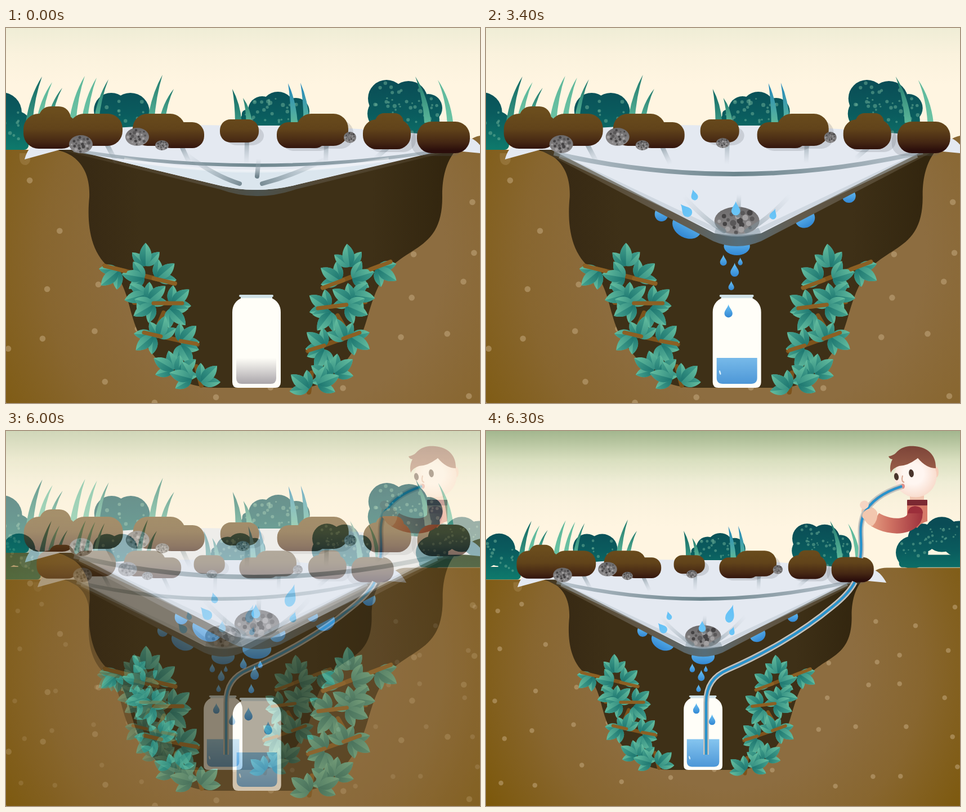
These frames come from a looping animation (842 by 665 pixels, 8000 ms). An HTML page:

```html
<!DOCTYPE html>
<html lang="en">
<head>
<meta charset="utf-8">
<title>Solar still</title>
<style>
html, body { margin: 0; width: 100%; height: 100%; overflow: hidden; }
svg { display: block; width: 100vw; height: 100vh; }
</style>
</head>
<body>
<svg id="stage" viewBox="0 0 842 665" preserveAspectRatio="none"></svg>
<script>
(() => {
let seed = 7;
const rnd = () => (seed = (seed * 16807) % 2147483647) / 2147483647;
const defs = [];

// Gradients in scene coordinates, or in the box of the shape when inBox is true
const grad = (id, [x1, y1, x2, y2], stops, inBox) => {
  defs.push(`<linearGradient id="${id}" x1="${x1}" y1="${y1}" x2="${x2}" y2="${y2}"` +
    (inBox ? '' : ' gradientUnits="userSpaceOnUse"') + '>' +
    stops.map(([o, c, a = 1]) => `<stop offset="${o}" stop-color="${c}" stop-opacity="${a}"/>`).join('') +
    '</linearGradient>');
};
const fade = (id, from, to, across) => grad(id, across ? [0, 0, 1, 0] : [0, 0, 0, 1], [[0, from], [1, to]], true);
grad('sky', [0, -113, 0, 100], [[0, '#a3b78f'], [.1, '#b4c39d'], [.3, '#d9dfbf'], [.53, '#efedd6'], [.75, '#faf2dd'], [1, '#fff5e1']]);
grad('bush', [0, 92, 0, 216], [[0, '#0a4c55'], [.5, '#0a5c5e'], [1, '#0e7a6c']]);
grad('soil', [0, 148, 0, 217], [[0, '#6b4d1d'], [.45, '#61431a'], [.8, '#442613'], [1, '#2b0e0b']]);
grad('pit', [146, 0, 776, 0], [[0, '#382a14'], [.15, '#3e3017'], [.8, '#3e3017'], [1, '#33260f']]);
grad('band', [95, 0, 800, 0], [[0, '#42351d'], [.15, '#574a34'], [.35, '#635b4d'], [.5, '#566d79'], [.65, '#635b4d'], [.85, '#574a34'], [1, '#42351d']]);
grad('fold', [120, 0, 775, 0], [[0, '#8fa0aa', .5], [.25, '#93a3ac'], [.5, '#6c858d'], [.75, '#93a3ac'], [1, '#8fa0aa', .5]]);
grad('water', [0, 570, 0, 631], [[0, '#85c5ef'], [1, '#4d97d7']]);
grad('glass', [0, 585, 0, 631], [[0, '#aaa6aa', 0], [1, '#aaa6aa']]);
grad('sleeve', [685, 0, 778, 0], [[0, '#e39b80'], [.35, '#cf7263'], [1, '#9c2f3b']]);
fade('stone', '#6b696a', '#8f8d8e');
fade('drop', '#6cc3f5', '#3287d3');
fade('pale', '#62bff5', '#6cc6f7');
fade('leaf', '#348f82', '#66bfa0', true);
fade('vein', '#1c756f', '#45a28e', true);
fade('light', '#5cb79a', '#6cc3a4');
fade('mid', '#20796d', '#5cb79a');
fade('dark', '#0f6763', '#3c9883');
fade('blue', '#2185bd', '#5cb79a');
fade('hair', '#7c4438', '#9c604a');
defs.push(`<radialGradient id="ground" gradientUnits="userSpaceOnUse" cx="500" cy="400" r="620">
  <stop offset=".45" stop-color="#8d6d40"/><stop offset=".7" stop-color="#88662f"/><stop offset="1" stop-color="#7c580b"/></radialGradient>
  <radialGradient id="face" cx=".45" cy=".45" r=".6"><stop offset=".4" stop-color="#fff6f1"/><stop offset="1" stop-color="#f8d9c9"/></radialGradient>`);

const path = (d, fill, more = '') => `<path d="${d}" fill="${fill}" ${more}/>`;
const line = (d, color, w, more = '') => path(d, 'none', `stroke="${color}" stroke-width="${w}" ${more}`);
const dot = (x, y, r, fill, more = '') => `<circle cx="${x}" cy="${y}" r="${r}" fill="${fill}" ${more}/>`;
const oval = (x, y, rx, ry, fill, turn = 0) =>
  `<ellipse cx="${x}" cy="${y}" rx="${rx}" ry="${ry}" fill="${fill}" transform="rotate(${turn} ${x} ${y})"/>`;
const box = (x, y, x2, y2, r, fill, more = '') =>
  `<rect x="${x}" y="${y}" width="${x2 - x}" height="${y2 - y}" rx="${r}" fill="${fill}" ${more}/>`;
const each = (list, f) => list.map(a => f(...a)).join('');
const round = 'stroke-linecap="round"';

const bush = (base, n, ...balls) => {
  const x1 = Math.min(...balls.map(b => b[0] - b[2] * .8)), x2 = Math.max(...balls.map(b => b[0] + b[2] * .8));
  let s = each(balls, (x, y, r) => dot(x, y, r, 'url(#bush)')) + box(x1, base - 28, x2, base, 8, 'url(#bush)');
  for (let i = 0; i < n; i++) {
    const [x, y, r] = balls[i % balls.length], a = rnd() * 6.28, d = r * .85 * Math.sqrt(rnd());
    s += dot(x + d * Math.cos(a), y + d * Math.sin(a), 1.5 + rnd() * 2.2, '#6fb39a', 'opacity=".5"');
  }
  return s;
};

// A row of grass blades leaning the same way
const tuft = (x, n, gap, tipY, fall, lean, ...fills) => {
  let s = '';
  for (let i = 0; i < n; i++, x += gap, tipY += fall) {
    const w = 6 - i * .7, cx = x + lean * .2, cy = 165 + (tipY - 165) * .55;
    s += path(`M${x - w} 168Q${cx - w * .7} ${cy} ${x + lean} ${tipY}Q${cx + w * .9} ${cy} ${x + w} 168Z`,
      `url(#${fills[i % fills.length]})`);
  }
  return s;
};

const stone = (x, y, rx, ry) => {
  let s = oval(x, y, rx, ry, 'url(#stone)');
  for (let i = 0; i < 20; i++) {
    const a = i * 2.4, d = Math.sqrt((i + .5) / 20) * .84, r = rx * (.06 + rnd() * .08);
    s += dot(x + Math.cos(a) * d * rx, y + Math.sin(a) * d * ry, r, ['#454344', '#5a5859', '#a3a1a2'][i % 3]);
  }
  return s;
};

const leaf = (x, y, turn, size) => `<g transform="translate(${x} ${y}) rotate(${turn}) scale(${size})">` +
  path('M0 0C.2-.33 .65-.36 1 0C.65 .36 .2 .33 0 0Z', 'url(#leaf)') +
  path('M0 0C.2-.33 .65-.36 1 0Z', 'url(#vein)') + '</g>';
const sprig = (x, y, turn) => leaf(x, y, turn - 45, 34) + leaf(x, y, turn + 45, 35) + leaf(x, y, turn, 41);

const drop = (x, y, s, turn = 0, fill = 'drop', wide = 1) =>
  path('M0-1C.1-.5 .6-.1 .6 .35A.6 .6 0 0 1-.6 .35C-.6-.1-.1-.5 0-1Z', `url(#${fill})`,
    `transform="translate(${x} ${y}) rotate(${turn}) scale(${s * wide} ${s})"`);

// A soft streak, strongest at its first end
let folds = 0;
const crease = (x1, y1, x2, y2, bend = 0, a = .6) => {
  const id = 'crease' + folds++;
  grad(id, [x1, y1, x2, y2], [[0, '#70848d', a], [1, '#a9b6c0', 0]]);
  return line(`M${x1} ${y1}Q${(x1 + x2) / 2} ${(y1 + y2) / 2 + bend} ${x2} ${y2}`, `url(#${id})`, 8, round);
};

// One pebble per cell of a loose grid
const pebbles = () => {
  let s = '';
  for (let y = 290; y < 720; y += 90)
    for (let x = -20; x < 1020; x += 92)
      s += dot(x + rnd() * 64 - 32, y + rnd() * 60 - 30, 5.3, '#c7ad84', 'opacity=".5"');
  return s;
};

const back = box(-40, -120, 1020, 230, 0, 'url(#sky)') +
  bush(216, 22, [-8, 150, 36], [17, 176, 29], [-38, 160, 30]) +
  bush(190, 14, [187, 146, 31], [221, 149, 34], [238, 165, 22]) +
  bush(173, 34, [455, 146, 25], [483, 143, 30], [515, 148, 24], [430, 164, 14]) +
  bush(185, 44, [676, 125, 33], [715, 128, 34], [750, 142, 25], [672, 152, 30], [736, 162, 34]) +
  bush(189, 32, [909, 156, 36], [932, 124, 32], [975, 116, 39], [1013, 126, 40]) +
  tuft(41, 3, 18, 86, 10, 23, 'dark', 'light', 'mid') + tuft(118, 3, 21, 85, 3, 22, 'light', 'light', 'mid') +
  tuft(257, 2, 20, 83, 25, 21, 'mid') + tuft(413, 2, 19, 108, 16, -11, 'dark', 'mid') +
  tuft(512, 2, 22, 98, -1, -11, 'blue') + tuft(749, 2, 40, 86, 6, -22, 'mid', 'light') +
  path('M-40 216H800C822 200 830 190 853 190H1020V725H-40Z', 'url(#ground)') + pebbles() +
  path('M88 216C125 222 150 250 148 300C144 340 146 400 190 430C225 470 215 520 250 565C285 610 310 637 370 638H525' +
    'C570 637 595 605 615 575C650 525 640 470 690 418C730 385 775 380 775 300C774 260 785 232 800 216Z', 'url(#pit)') +
  path('M24 222Q22 244 36 243Q44 240 43 230L36 222Z', '#b99b68', 'opacity=".3"');

const plant = line('M175 422L300 453M228 487L313 488M245 540L340 561M347 634L338 600M265 540L280 505M290 592L310 570M232 470L240 495',
    '#7d531c', 8, round) +
  each([[200, 430, 140], [248, 422, -90], [246, 443, 190], [268, 444, -40], [250, 472, 165], [252, 484, -40], [262, 490, 150],
    [294, 490, -40], [290, 498, 45], [262, 545, 140], [272, 550, -75], [309, 557, -45], [310, 562, 60], [298, 606, -150],
    [306, 614, -40], [330, 622, 195], [346, 628, -45]], sprig) +
  line('M175 422L212 431M262 444L300 453M262 488L313 488M245 540L275 547M310 555L338 560', '#8c6024', 7, round);

const clods = [[58, 139, 115, 185], [31, 152, 126, 214], [112, 152, 207, 209], [225, 152, 318, 209], [272, 167, 352, 213],
  [380, 162, 449, 203], [481, 167, 570, 213], [516, 152, 608, 209], [656, 151, 706, 185], [634, 162, 719, 215], [730, 166, 824, 222]];
const shade = (x, y, x2, y2) => {
  const dx = x > 720 ? -10 : 9;
  return box(x + dx, y + 12, x2 + dx, y2 + 5, 22, '#59616c', 'opacity=".2"');
};
const clod = (x, y, x2, y2) => box(x, y, x2, y2, Math.min(27, (y2 - y) * .46), 'url(#soil)');
const front = each(clods.slice(5), shade) + each(clods, clod) +
  each([[133, 206, 21, 16], [233, 193, 21, 16], [277, 208, 12, 9], [611, 194, 11, 10]], stone);
const small = stone(420, 204, 12, 9);

const rim = 'M33 233C36 222 42 208 60 200C200 165 330 173 445 173C600 173 700 185 825 195C838 200 846 212 852 223L780 216';
const sheet = (inner, outer, opacity) => path(outer, 'url(#band)', `opacity="${opacity}"`) +
  path(rim + inner + 'L116 216L95 216Z', '#e4e9f1');
const hung = crease(180, 208, 197, 240) + crease(313, 212, 327, 242) + crease(428, 201, 427, 242) +
  crease(569, 206, 568, 240) + crease(683, 208, 655, 232);

const shallow = sheet('L520 277Q445 297 370 277', 'M95 216L380 286Q445 310 515 286L800 216Z', .55) +
  path('M200 236Q445 272 690 236L520 277Q445 297 370 277Z', '#dbe6ee') +
  line('M120 217Q445 270 775 217', 'url(#fold)', 6) + line('M210 232Q445 276 680 232', '#fff', 5, 'opacity=".35"') +
  hung + crease(415, 276, 318, 222, 12, .9) + crease(455, 276, 572, 230, 8, .9) + crease(446, 263, 449, 232, 0, 1);

const deep = sheet('L488 364Q445 370 405 364', 'M95 216L403 378Q445 396 488 378L800 216Z', 1) +
  line('M130 227L407 358Q445 372 486 358L765 226', '#b3c1cb', 8, 'opacity=".45"') +
  line('M120 222Q440 297 775 220', 'url(#fold)', 8) + hung;
const weight = stone(445, 342, 40, 25) + path('M408 354Q445 376 483 354L488 364Q445 376 405 364Z', '#93a3ad', 'opacity=".55"') +
  crease(422, 360, 350, 298, 10) + crease(462, 360, 540, 296, 12) + crease(447, 332, 449, 295, 0, .9);

const jar = level => box(417, 475, 473, 490, 0, '#d3e3e8') + box(414, 473, 475, 477, 2, '#cfe0e6') +
  path('M418 479H472C481 483 488 491 488 504V628Q488 638 478 638H412Q402 638 402 628V504C402 491 409 483 418 479Z', '#fffef8') +
  (level ? path(`M409 ${level}H481V620Q481 631 470 631H420Q409 631 409 620Z`, 'url(#water)') +
    (level < 590 ? oval(415, 611, 1.4, 4, '#d9f0fd', -15) : '')
    : path('M409 585H480V621Q480 631 470 631H419Q409 631 409 621Z', 'url(#glass)'));

// Each drop begins with the wet stage (1 to 4) in which it appears
const onSheet = [[1, 354, 323, 14, -40, 'pale'], [1, 510, 330, 10, 18, 'pale'], [2, 369, 296, 10, -15, 'pale'],
  [3, 443, 320, 13, 0, 'pale'], [4, 506, 292, 21, 16, 'pale', .75]];
const under = [[1, 311, 330, 12, 13], [1, 566, 338, 18, 16, -28], [1, 644, 298, 12, 12], [2, 356, 352, 27, 20, 28]];
const falling = [[2, 441, 429, 12.5], [2, 451, 414, 7], [3, 421, 412, 10], [3, 435, 457, 8.5], [3, 430, 502, 12], [4, 465, 527, 12]];
const wetBy = (list, n, f) => each(list.filter(d => d[0] <= n), (_, ...a) => f(...a));

const scene = (wet, sunk = true) => '<use href="#back"/>' +
  wetBy(under, wet, (x, y, rx, ry, turn) => oval(x, y, rx, ry, 'url(#drop)', turn)) +
  (wet ? oval(445, 387, 16 + wet * 2.4, 13 + wet, 'url(#drop)') : '') +
  (sunk ? '<use href="#deep"/>' : shallow) + '<use href="#front"/>' +
  (wet ? small : '') + (sunk ? '<use href="#weight"/>' : '') +
  '<use href="#plant"/><use href="#plant" transform="translate(868 0) scale(-1 1) rotate(7 240 500)"/>' +
  jar(wet && 630 - wet * 15) + wetBy(onSheet, wet, drop) + wetBy(falling, wet, drop) +
  (wet === 1 ? drop(446, 437, 8.5) : '');

const tube = d => line(d, '#c6c5c0', 10) + line(d, '#7f9aa8', 5.5) + line(d, '#2493cf', 3.6);
const person = oval(799, 73, 5, 10, '#f6cdb9') +
  box(753, 108, 778, 126, 2, '#f1c6b0') + path('M748 130H784V160Q772 163 766 172L748 160Z', '#d67a68') +
  box(748, 122, 784, 132, 1, '#7b2932') +
  line('M762 145C764 170 722 176 691 157', 'url(#sleeve)', 27) + path('M749 146Q750 134 762 133Q776 134 776 146Z', '#9c2f3b') +
  path('M668 136Q664 148 674 160Q682 170 687 168Q697 158 695 144Q688 132 676 134Z', '#f3c7ae') +
  dot(763, 80, 37.5, 'url(#face)') +
  path('M715 45Q724 43 728 39C738 27 752 26 762 27C785 29 800 43 799 66Q782 66 767 48Q750 62 734 62Q722 66 719 74Q716 62 722 50Q717 50 715 45Z', 'url(#hair)') +
  oval(729, 81, 4, 6.5, '#49342b', -10) + oval(755.5, 75, 4.3, 7, '#49342b', -10) +
  line('M740 79Q737 90 743 91', '#d9a893', 2) + oval(740, 98, 4, 4.5, '#dd8f8a');

const drinking = `<g transform="translate(29.6 90.6) scale(.8)">${scene(4)}</g>` + person +
  tube('M391 574V482C391 452 404 434 430 423C490 397 560 358 615 312Q645 288 655 268') +
  tube('M665 225C670 195 660 175 671 148Q688 114 739 98') +
  oval(672, 131, 8, 7.5, '#f5d5c3', -20) + oval(679, 147, 12, 8, '#f3c7ae', -35);

const wetScene = n => `<g transform="translate(.7 0)">${scene(n)}</g>`;
const views = [scene(0, false), scene(0), ...[1, 2, 3, 4].map(wetScene), drinking];
const shared = Object.entries({ back, front, plant, deep, weight });
const svg = document.getElementById('stage');
svg.innerHTML = `<defs>${defs.join('')}${shared.map(([id, s]) => `<g id="${id}">${s}</g>`).join('')}</defs>` +
  views.map(v => `<g class="view">${v}</g>`).join('');
const layers = [...svg.querySelectorAll('.view')];

// Views change in steps of 100 ms: fade, hold, four wet stages, fade, hold
function draw(t) {
  const step = Math.floor(t / 100);
  let base = 6, over = -1, mix = 0;
  if (step < 4) [base, over, mix] = [0, 1, step / 4];
  else if (step < 24) base = 1;
  else if (step < 59) base = Math.min(5, 2 + Math.floor((step - 24) / 5));
  else if (step < 63) [base, over, mix] = [5, 6, (step - 58) / 5];
  layers.forEach((g, i) => {
    const a = i === base ? 1 : i === over ? mix : 0;
    g.style.display = a ? '' : 'none';
    g.setAttribute('opacity', a);
  });
}

const begin = performance.now();
function tick() {
  draw((performance.now() - begin) % 8000);
  requestAnimationFrame(tick);
}
tick();
})();
</script>
</body>
</html>
```
